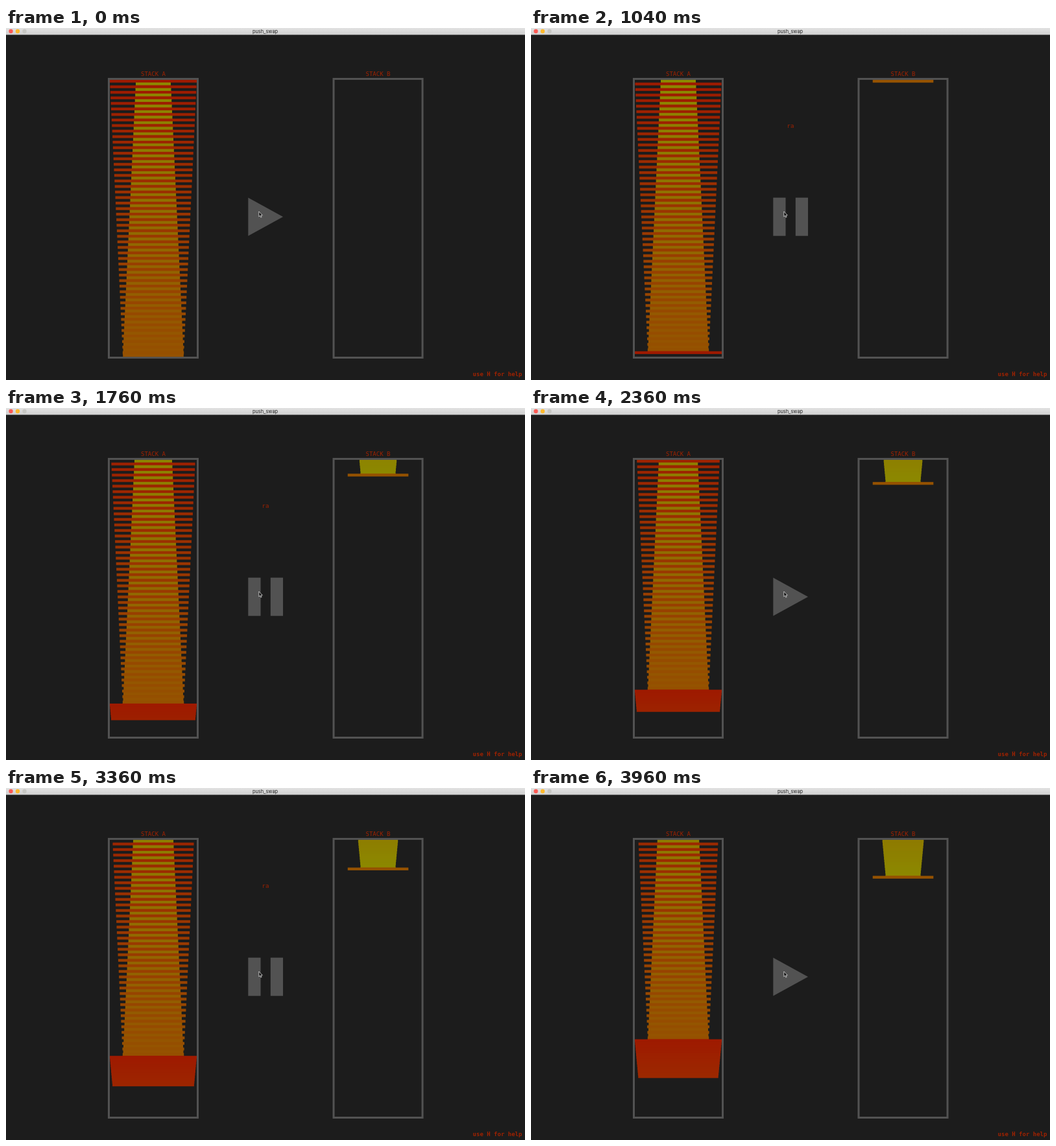
Recreate the animation shown at these times as an HTML page with a canvas. Size 800x543 px, loop 4 s.

```html
<!DOCTYPE html>
<html lang="en">
<head>
<meta charset="utf-8">
<title>push_swap</title>
<style>
  html, body { margin: 0; width: 100%; height: 100%; overflow: hidden; background: #1c1c1c; }
  canvas { display: block; }
</style>
</head>
<body>
<canvas id="stage" width="800" height="543"></canvas>
<script>
const ctx = document.getElementById('stage').getContext('2d');
const LOOP = 4000, STEP = 72, COUNT = 100;
const TOP = 80, ROW = 4.272;
const A_X = 227, B_X = 573.5;
const GREY = '#525252', RED = '#a02200';
const MONO = '"DejaVu Sans Mono", monospace';
// Spells of playing: start, stop, operations already done.
const RUNS = [[880, 2160, 0], [3040, 3800, 18]];

const opName = n => n === 1 ? 'rra' : n % 2 ? 'ra' : 'pb';

function progress(t) {
  let done = 0, playing = false;
  for (const [start, stop, before] of RUNS) {
    if (t < start) break;
    playing = t < stop;
    done = before + Math.floor((Math.min(t, stop - 1) - start) / STEP) + 1;
  }
  return { done, playing };
}

function stacksAfter(done) {
  const a = Array.from({ length: COUNT }, (_, i) => i % 2 ? (i - 1) / 2 : COUNT - 1 - i / 2);
  const b = [];
  for (let n = 1; n <= done; n++) {
    const op = opName(n);
    if (op === 'rra') a.unshift(a.pop());
    else if (op === 'ra') a.push(a.shift());
    else b.unshift(a.shift());
  }
  return [a, b];
}

const barWidth = rank => 54 + 80 * rank / (COUNT - 1);

function barColor(rank) {
  const k = rank / (COUNT - 1);
  return `rgb(${140 + 18 * k}, ${136 - 110 * k}, 0)`;
}

function box(color, x, y, w, h) {
  ctx.fillStyle = color;
  ctx.fillRect(x, y, w, h);
}

function dot(color, x) {
  ctx.fillStyle = color;
  ctx.beginPath();
  ctx.arc(x, 5, 3.2, 0, Math.PI * 2);
  ctx.fill();
}

function label(text, x, y, font = '9px ' + MONO, color = RED) {
  ctx.font = font;
  ctx.fillStyle = color;
  ctx.textAlign = 'center';
  ctx.fillText(text, x, y);
}

function shape(points) {
  ctx.beginPath();
  for (const [x, y] of points) ctx.lineTo(x, y);
  ctx.closePath();
}

function drawStack(ranks, mid, name) {
  ctx.strokeStyle = GREY;
  ctx.lineWidth = 3;
  ctx.strokeRect(mid - 68.5, 78.5, 137, 430);
  label(name, mid, 73.5);
  // Back the joins so that touching bars leave no dark seam.
  for (let i = 1; i < ranks.length; i++) {
    const w = Math.min(barWidth(ranks[i]), barWidth(ranks[i - 1]));
    box(barColor(ranks[i]), mid - w / 2, TOP + i * ROW - 1, w, 2);
  }
  ranks.forEach((rank, i) => {
    const w = barWidth(rank);
    box(barColor(rank), mid - w / 2, TOP + i * ROW, w, ROW);
  });
}

function drawWindow() {
  box('#1c1c1c', 0, 0, 800, 543);
  const bar = ctx.createLinearGradient(0, 0, 0, 10.5);
  bar.addColorStop(0, '#e2e2e2');
  bar.addColorStop(1, '#d0d0d0');
  box(bar, 0, 0, 800, 10.5);
  dot('#fc5b54', 7.5);
  dot('#fdb92d', 18);
  dot('#c6c6c2', 28.5);
  label('push_swap', 399.5, 7.6, '7.4px Inter, sans-serif', '#222');
}

function drawButton(playing) {
  if (playing) {
    box(GREY, 373.3, 261.7, 19.2, 59);
    box(GREY, 407.8, 261.7, 19.2, 59);
    return;
  }
  shape([[373.3, 261.7], [427, 291.2], [373.3, 320.8]]);
  ctx.fillStyle = GREY;
  ctx.fill();
}

function drawCursor() {
  ctx.save();
  ctx.translate(389.8, 283);
  shape([[0, 0], [0, 8], [1.8, 6.4], [3, 9.2], [4.3, 8.6], [3.1, 5.9], [5.5, 5.9]]);
  ctx.fillStyle = '#111';
  ctx.fill();
  ctx.strokeStyle = '#ddd';
  ctx.lineWidth = 0.8;
  ctx.stroke();
  ctx.restore();
}

function draw(t) {
  const { done, playing } = progress(t);
  const [a, b] = stacksAfter(done);
  drawWindow();
  drawStack(a, A_X, 'STACK A');
  drawStack(b, B_X, 'STACK B');
  if (playing) label(opName(done), 400, 153.5);
  drawButton(playing);
  drawCursor();
  label('use H for help', 757.5, 537.3, 'bold 9px ' + MONO);
}

const began = performance.now();
function tick() {
  draw((performance.now() - began) % LOOP);
  requestAnimationFrame(tick);
}
tick();
</script>
</body>
</html>
```
